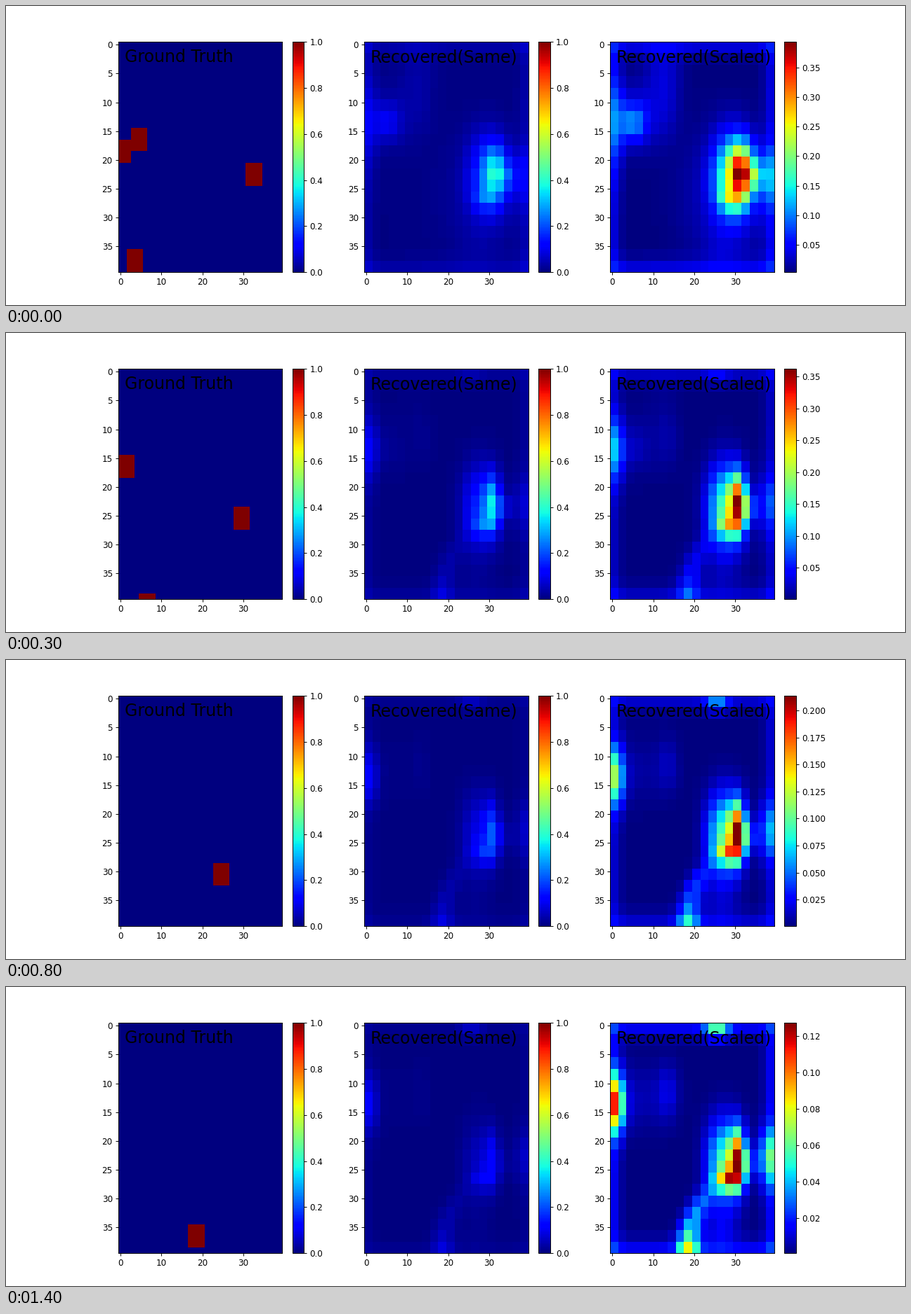
These frames come from a looping animation (1280 by 427 pixels, 1.5 s). A matplotlib script:

```python
import matplotlib.pyplot as plt
import numpy as np
from matplotlib.animation import FuncAnimation

FRAMES, INTERVAL = 15, 100
CELLS, SIZE = 20, 40
DPI = 1280 / 15

# Peak of the recovered field at a few key frames.
PEAK_AT = (0, 2, 4, 6, 10, 12, 14)
PEAKS = (0.393, 0.424, 0.300, 0.240, 0.187, 0.1625, 0.1274)

# Moving squares: start column, start row, column step, row step.
SQUARES = [(31, 21, -1, 1), (3, 15, -1, 0), (-1, 17, -1, 1), (2, 36, 1, 1)]
SIDE = 4

row, col = np.mgrid[:CELLS, :CELLS]


def bell(x, width):
    return np.exp(-(x / width) ** 2 / 2)


def bump(x, y, wide, tall):
    return bell(col - x, wide) * bell(row - y, tall)


def truth(k):
    grid = np.zeros((SIZE, SIZE))
    for x, y, dx, dy in SQUARES:
        left, top = x + dx * k, y + dy * k
        grid[max(top, 0):max(top + SIDE, 0),
             max(left, 0):max(left + SIDE, 0)] = 1
    return grid


def border(k):
    last = CELLS - 1
    rim = sum(bell(d, 0.6) for d in (row, last - row, col, last - col))
    return (0.012 + 0.02 * np.exp(-k / 3)) * rim


def hot_spot(k, early):
    """Main spot: drifts left and sharpens as the early blur fades."""
    body = 0.42 * bump(13.4 + 0.8 * early, 11.5 - 0.4 * early,
                       1.4 + 0.1 * early, 2.4)
    core = 0.7 * bump(15 + 0.5 * early, 11.2 - 0.3 * early,
                      0.65 + 0.3 * early, 1.7)
    foot = (0.22 + 0.3 * k / FRAMES) * bump(14.1, 13.1, 1, 0.65)
    side = 0.2 * bump(16.2 + 0.7 * early, 11.6 - 0.5 * early, 0.8, 0.8)
    return body + core + foot + side


def left_spot(early):
    narrow = (0.1 - 0.04 * early) * bump(0, 6.5, 0.83, 1.7 + early)
    spread = 0.08 * early * bump(2.3, 6.5, 1.1, 1.1)
    halo = (0.006 + 0.03 * early) * bump(3, 6, 2.5, 2)
    return narrow + spread + halo


def trail(k):
    """Curved tail from the hot spot down to the lower border."""
    up = CELLS - 1 - row
    ridge = bell(col - 9 - 0.1 * up ** 2, 0.9)
    level = 0.035 + 0.035 * np.exp(-up / 1.5)
    fade = 1 / (1 + 2 * np.exp(up - 5.5))
    return (1 - np.exp(-k)) * level * fade * ridge


def recovered(k):
    peak = np.interp(k, PEAK_AT, PEAKS)
    early = np.exp(-k / 1.5)
    late = k ** 2 / (k ** 2 + 9)
    field = border(k) + peak * hot_spot(k, early) + left_spot(early) + trail(k)
    field += (0.05 + 0.04 * early) * bump(19, 11.2, 0.9 + 0.5 * early, 1.7)
    field += 0.05 * late * bump(12.5, 0, 1, 0.6)
    field += 0.01 * (bump(6.5, 5.5, 0.9, 1.7) + bump(13, 17.5, 1.5, 1.8))
    field += 0.03 * early * (bump(6, 2, 1.5, 2) + bump(14, 13, 4, 4))

    low = 0.0005 + 0.0033 * early
    unit = (field - field.min()) / (field.max() - field.min())
    return low + (peak - low) * unit


def panel(index, title, data):
    ax = fig.add_subplot(1, 3, index)
    image = ax.imshow(data, cmap="jet", vmin=0, vmax=1, aspect="auto",
                      interpolation="nearest",
                      extent=(-0.5, SIZE - 0.5, SIZE - 0.5, -0.5))
    fig.colorbar(image, ax=ax)
    ax.text(1, 3, title, fontsize=20, color="black")
    return image


plt.rcParams["font.family"] = "DejaVu Sans"
# The tiny surplus keeps the pixel size from rounding down.
fig = plt.figure(figsize=(1280 / DPI + 1e-7, 427 / DPI + 1e-7), dpi=DPI,
                 facecolor="white")
truth_image = panel(1, "Ground Truth", truth(0))
same_image = panel(2, "Recovered(Same)", recovered(0))
scaled_image = panel(3, "Recovered(Scaled)", recovered(0))


def update(k):
    field = recovered(k)
    truth_image.set_data(truth(k))
    same_image.set_data(field)
    scaled_image.set_data(field)
    scaled_image.set_clim(field.min(), field.max())
    return truth_image, same_image, scaled_image


anim = FuncAnimation(fig, update, frames=FRAMES, interval=INTERVAL,
                     init_func=lambda: update(0), repeat=True,
                     repeat_delay=0, blit=False)
plt.show()
```
